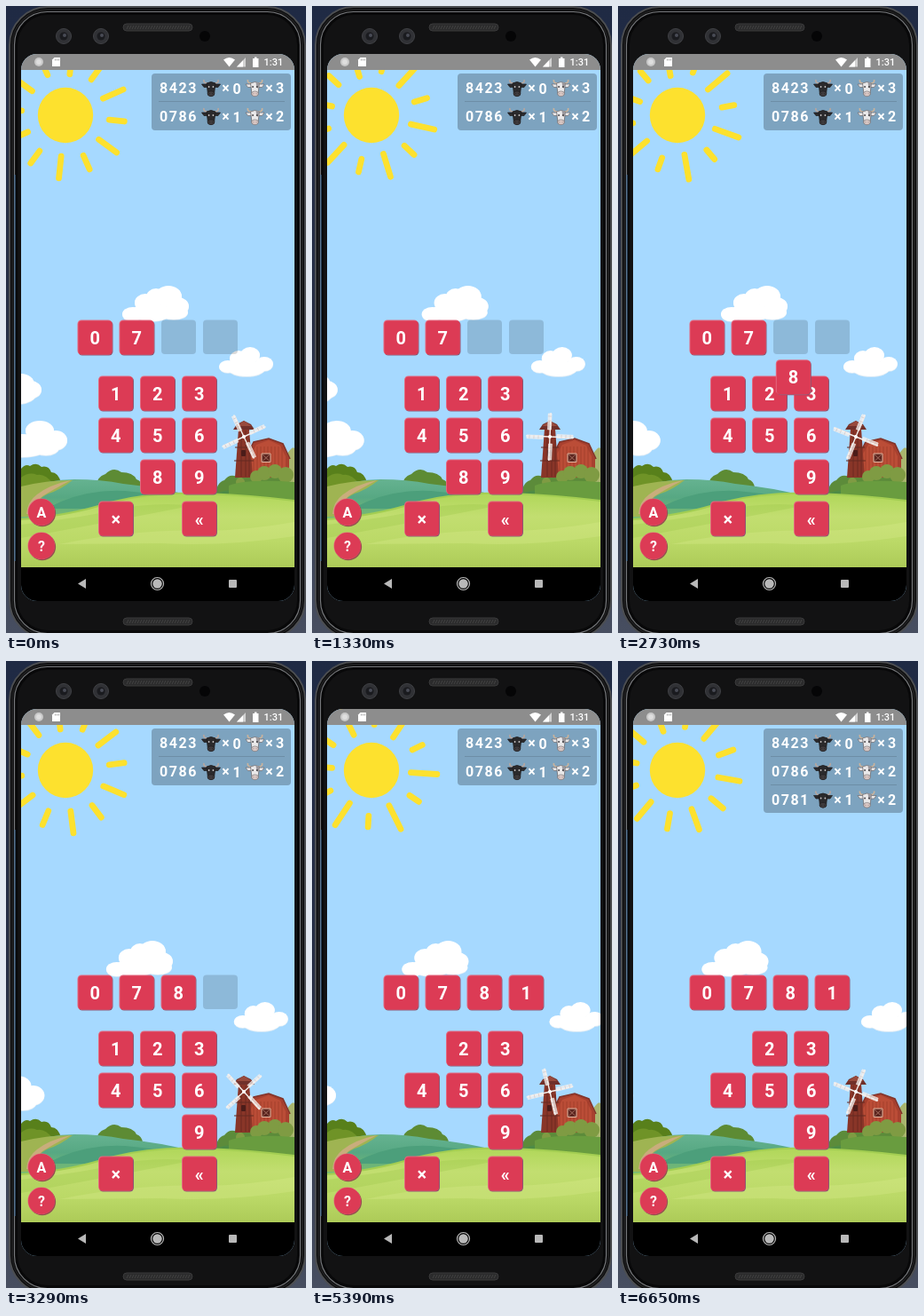
Animation of 338 by 706 pixels, one loop 6.72 s. Source, as an HTML page with a canvas:

```html
<!DOCTYPE html>
<html lang="en">
<head>
<meta charset="utf-8">
<title>Bulls and cows</title>
<style>
  html, body { margin: 0; width: 100%; height: 100%; overflow: hidden; background: #222c46; }
  canvas { display: block; width: 338px; height: 706px; }
</style>
</head>
<body>
<canvas></canvas>
<script>
const LOOP = 6720, STEP = 70, RED = '#dc3b55', SKY = '#a6d9ff';
const canvas = document.querySelector('canvas');
const dpr = window.devicePixelRatio || 1;
canvas.width = 338 * dpr;
canvas.height = 706 * dpr;
const g = canvas.getContext('2d');
g.scale(dpr, dpr);

const clamp = p => Math.max(0, Math.min(1, p));
const rad = deg => deg * Math.PI / 180;

function paint(path, fill, stroke, width = 1) {
  if (fill) { g.fillStyle = fill; g.fill(path); }
  if (stroke) { g.strokeStyle = stroke; g.lineWidth = width; g.stroke(path); }
}
const shape = (d, ...style) => paint(new Path2D(d), ...style);
function box(x, y, w, h, r, ...style) {
  const p = new Path2D();
  p.roundRect(x, y, w, h, r);
  paint(p, ...style);
}
function oval(x, y, rx, ry, ...style) {
  const p = new Path2D();
  p.ellipse(x, y, rx, ry, 0, 0, 7);
  paint(p, ...style);
}
const disc = (x, y, r, ...style) => oval(x, y, r, r, ...style);
function text(s, x, y, size, align = 'center', spacing = 0, weight = 700) {
  g.font = `${weight} ${size}px Roboto, sans-serif`;
  g.letterSpacing = spacing + 'px';
  g.textAlign = align;
  g.fillStyle = '#fff';
  g.fillText(s, x, y);
}
function shade(y0, y1, ...colors) {
  const grad = g.createLinearGradient(0, y0, 0, y1);
  colors.forEach((c, i) => grad.addColorStop(i / (colors.length - 1), c));
  return grad;
}

function phone() {
  g.fillStyle = shade(0, 706, '#1f2a44', '#272f45', '#474e60');
  g.fillRect(0, 0, 338, 706);
  box(4, 1, 333, 711, 43, '#0a0a0b', '#4c4e51', 2);
  box(7, 4, 327, 705, 40, null, '#1d1d1e', 2);
  box(9.5, 6.5, 322, 700, 37, null, '#77797c', 1.2);
  box(12, 9, 317, 695, 35, '#121213', '#080809', 2);
  shape('M10 190V625', null, '#3f6f9c', 1);
  for (const y of [20, 689]) {
    box(132, y, 78, 8, 4, '#2b2b2c', '#3a3a3b', 1);
    for (let x = 136; x < 208; x += 3) shape(`M${x} ${y + 6}l2-4`, null, '#4a4a4a', 0.8);
  }
  for (const x of [65, 107]) {
    disc(x, 34, 8.5, '#303135', '#404145');
    disc(x, 34, 4.5, '#1a1b1f');
    disc(x + 1, 33, 2, '#484b55');
  }
  disc(224, 34, 6, '#050506');
}

function sun(t) {
  const pulse = Math.sin((t - 0.5) * 2 * Math.PI / 6.6);
  g.save();
  g.translate(67, 123);
  disc(0, 0, 31.2, '#fde12e');
  g.rotate(rad(6 + 5.1 * t));
  g.lineCap = 'round';
  for (let i = 0; i < 12; i++) {
    const u = i % 2 ? -pulse : pulse;
    shape(`M${48 - 3.5 * u} 0H${69 + 5 * u}`, null, '#fde12e', 6.8);
    g.rotate(rad(30));
  }
  g.restore();
}

function cloud(x, y, puffs) {
  g.save();
  g.translate(x, y);
  for (const p of puffs) oval(p[0], p[1] + 0.8, p[2], p[3], '#e4eef5');
  for (const p of puffs) oval(...p, '#fff');
  g.restore();
}
function clouds(t) {
  cloud(131 - 5.5 * t, 315, [[12, 32, 12, 8], [26, 19, 12, 10], [38, 13, 11, 10], [52, 12, 15, 12],
    [63, 23, 12, 10], [33, 30, 23, 10], [58, 30, 16, 8]]);
  cloud(240 + 5.1 * t, 384, [[10, 22, 10, 7], [22, 13, 10, 9], [35, 9, 11, 9],
    [51, 19, 10, 8], [31, 24, 21, 9]]);
  cloud(-7.8 * t, 467, [[56, 22, 13, 11], [38, 11, 16, 11], [45, 30, 15, 9], [18, 28, 32, 13]]);
  cloud(-8.4 * t, 414, [[28, 18, 12, 10], [17, 12, 15, 12], [14, 23, 20, 11]]);
}

function land() {
  // distant trees and fields
  shape('M17 521q5-6 10-3q7-5 13 1q8-2 11 6q8 0 11 12v10H17z', '#58801b');
  shape('M17 531q9-7 18-3q9-2 18 10v6H17z', '#6f9327');
  shape('M101 542q1-12 11-15q9-9 18-2q13 0 17 8q6 2 7 9z', '#5d8b34');
  shape('M236 552q1-16 10-18q6-8 14-4q20-5 40-3q14-4 25-1v36h-89z', '#5c8b3a');
  shape('M314 526q-1-20 6-26q3-4 5-2v40h-11z', '#a9b56e');
  shape('M17 545q30-12 60-12q30 0 55 5q40 4 80 14v40H17z', shade(532, 575, '#66b391', '#57a883', '#78bb72'));
  shape('M17 541q28-7 58-7q-14 11-27 15q-16 7-22 26h-9z', '#9fb452');
  shape('M73 534q-24 5-38 16q-11 8-12 22h8q0-12 10-20q13-8 32-18z', '#c9ad7c');
  shape('M62 558q40-16 82-11q30 3 60 7l-60 12H45z', '#4c9f7b');
  shape('M232 549q45-11 93-4v18h-93z', '#4f8b45');
}

function barn() {
  shape('M271 531v-23l8-17 17-4 16 6 7 16v22z', '#a8402f');
  shape('M275 528v-22l7-12 14-5 13 6 6 12v21z', '#bb4d37');
  for (let x = 279; x < 315; x += 4) shape(`M${x} 496v30`, null, '#9d3a2a', 0.7);
  shape('M270 509l9-18 17-4 16 6 8 17', null, '#82342a', 1.6);
  box(288, 504, 10, 9.5, 0, '#5b251f', '#e5b9a3', 1);
  shape('M288 504l10 9.5m0-9.5l-10 9.5', null, '#b98272', 0.7);
  shape('M262 476h12l4 55h-20z', '#893528');
  shape('M265 478v52m5-52v52m4-42v42', null, '#6d2b21', 1);
  shape('M258 497h20m-21 15h22', null, '#652a21', 1.2);
  box(265, 500, 5, 7, 1, '#4b1c19');
  shape('M256 477l4-6 8-4 8 4 4 6z', '#70302a');
  shape('M259 473l9-6 9 6z', '#984a3c');
  for (const [x, y, r] of [[282, 530, 7], [291, 526, 8], [303, 524, 8], [315, 528, 9], [264, 536, 5]])
    disc(x, y, r, '#7f9b43');
  shape('M251 540q20-8 74-4v24h-74z', '#699c3f');
}

function windmill(t) {
  g.save();
  g.translate(268, 485);
  g.rotate(rad(65 - 114.7 * t));
  g.lineCap = 'butt';
  for (let i = 0; i < 4; i++) {
    shape('M0 0V-27', null, '#f5f1ee', 1.4);
    shape('M-2.8-8V-26H1V-8z', 'rgba(245,241,238,.75)', '#f5f1ee', 0.6);
    shape('M-2.8-13H1m-3.8-5H1m-3.8-5H1', null, '#cdb8b3', 0.5);
    g.rotate(Math.PI / 2);
  }
  disc(0, 0, 2, '#fff');
  g.restore();
}

function meadow() {
  shape('M17 578q55-4 100-19q50-13 108-10q50 2 100 8v75H17z',
    shade(546, 632, '#aed657', '#c2de70', '#bbd967', '#adcb58'));
  shape('M17 578q55-4 100-19q50-13 108-10q50 2 100 8', null, '#a3ce52', 2);
  shape('M17 584q70-8 130-21q40-4 60 0q-80 16-190 36z', 'rgba(151,196,72,.3)');
  shape('M60 606q90-18 170-15q50-2 95-10v16q-80 12-150 8z', 'rgba(219,235,142,.3)');
}

function key(label, x, y) {
  box(x - 18.5, y - 18.5, 39, 39, 4.5, '#8d5672');
  box(x - 19.5, y - 19.5, 39, 39, 4.5, '#e4677e');
  box(x - 18.5, y - 18.5, 38, 38, 4, RED);
  text(label, x + 0.2, y + 7.5, 20);
}
function roundKey(label, x, y) {
  disc(x + 0.8, y + 1, 15.3, '#96504f');
  disc(x - 0.3, y - 0.3, 15.2, '#e4677e');
  disc(x, y, 14.9, RED);
  text(label, x, y + 5.8, 16);
}
// A key flies to its slot, overshooting sideways.
function flyingKey(label, x, y, slot, start, t) {
  const q = clamp((t - start) / 0.6) - 1;
  const px = 1 + 3.2 * q ** 3 + 2.2 * q * q, py = 1 - q * q;
  key(label, x + (slot - x) * px, y + (373 - y) * py);
}
function keys(t) {
  for (const x of [194, 241]) box(x - 19, 353.5, 39, 38.5, 4, 'rgba(0,0,0,.15)');
  key('0', 100, 373);
  key('7', 147, 373);
  for (const n of [2, 3, 4, 5, 6, 9])
    key(n, 123.5 + (n - 1) % 3 * 47, 436 + Math.floor((n - 1) / 3) * 47);
  key('×', 123.5, 577);
  key('«', 217.5, 577);
  flyingKey('8', 170.5, 530, 194, 2.45, t);
  flyingKey('1', 123.5, 436, 241, 4.13, t);
  roundKey('A', 40, 570);
  roundKey('?', 40, 608);
}

function head(x, y, bull) {
  const face = bull ? '#2b2a2c' : '#e9e8e9', line = bull ? '#1d1c1e' : '#6d6a6e';
  g.save();
  g.translate(x, y);
  shape('M-4-5Q-9-5-8-9M4-5Q9-5 8-9', null, bull ? '#b7a7a0' : '#cbb39b', 1.7);
  shape('M-4-4l-6.5 0 2.5 3.500 4 0zM4-4l6.500 0-2.500 3.500-4 0z', face, line, 0.7);
  shape('M-5-5Q0-8 5-5L4 3 3.500 8Q0 11-3.500 8L-4 3z', face, line, 0.8);
  if (!bull) shape('M1-6Q4-7 5-4L4 1 2 0z', '#9b989d');
  oval(0, 6.8, 3.8, 2.9, bull ? '#403c3e' : '#dccbc8', line, 0.6);
  for (const s of [-1, 1]) {
    disc(s * 2.4, -1, 0.9, bull ? '#c9c5c5' : '#39373b');
    disc(s * 1.5, 6.8, 0.5, bull ? '#151515' : '#806965');
  }
  g.restore();
}
function guess(number, bulls, cows, y) {
  text(number, 173, y + 6, 16, 'left', 1.6);
  head(231, y, true);
  text('×', 247.5, y + 6, 16);
  text(bulls, 260, y + 6.5, 16);
  head(280.5, y, false);
  text('×', 296.5, y + 6, 16);
  text(cows, 308.5, y + 6, 16);
}
function history(t) {
  const grow = clamp((t - 5.6) / 0.3);
  box(164, 76, 157, 64 + 31 * grow, 4, 'rgba(0,0,0,.25)');
  shape('M172 107.5H314', null, 'rgba(0,0,0,.13)');
  guess('8423', 0, 3, 92);
  guess('0786', 1, 2, 124);
  if (!grow) return;
  g.globalAlpha = grow;
  shape('M172 139.5H314', null, 'rgba(0,0,0,.13)');
  guess('0781', 1, 2, 155.5);
  g.globalAlpha = 1;
}

function bars() {
  g.fillStyle = '#8d8d8d';
  g.fillRect(17, 54, 308, 18);
  disc(37, 63, 5, '#c9c9c9');
  disc(37, 63, 3, '#dedede');
  shape('M54.5 58H61V68H52V60.5z', '#fff');
  shape('M55.5 59.5v2m2-2v2m2-2v2', null, '#8d8d8d', 0.8);
  shape('M251.5 68.5L245 60.5Q251.5 55.5 258 60.5z', '#fff');
  shape('M260 68.5H270V58z', '#d2d2d2');
  shape('M260 68.5H267V61.2z', '#fff');
  shape('M278 59h2v-1.5h2.5V59h2v10H278z', '#fff');
  text('1:31', 290.5, 67, 11, 'left', 0, 500);
  g.fillStyle = '#000';
  g.fillRect(17, 632, 308, 38);
  shape('M81 650.5l9-5.5v11z', '#b9b9b9');
  disc(170.5, 650.5, 5.2, '#b9b9b9');
  disc(170.5, 650.5, 7, null, '#b9b9b9', 1.2);
  box(251, 646, 9, 9, 1, '#b9b9b9');
}

function draw(now) {
  const t = Math.floor(now % LOOP / STEP) * STEP / 1000;
  phone();
  g.save();
  g.beginPath();
  g.roundRect(17, 54, 308, 616, 18);
  g.clip();
  g.fillStyle = SKY;
  g.fillRect(17, 54, 308, 616);
  sun(t);
  clouds(t);
  land();
  barn();
  windmill(t);
  meadow();
  keys(t);
  history(t);
  bars();
  g.restore();
}

const begin = performance.now();
function frame() {
  draw(performance.now() - begin);
  requestAnimationFrame(frame);
}
frame();
</script>
</body>
</html>
```
